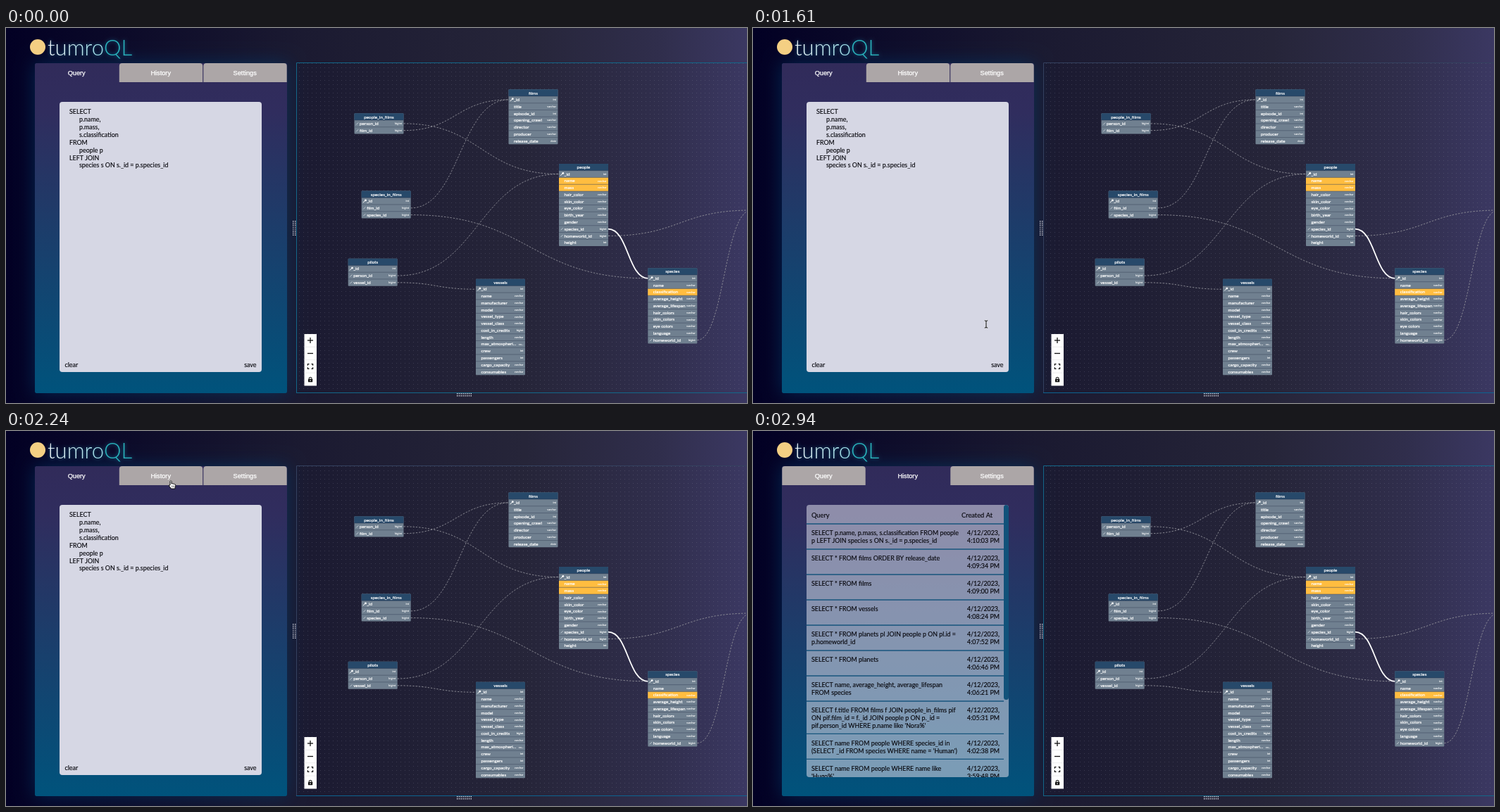
Write an HTML page with a canvas that moves like this. It is 1052 px wide and 533 px high and loops after 3920 ms.

```html
<!DOCTYPE html>
<html lang="en">
<head>
<meta charset="utf-8">
<title>Query history</title>
<style>
  html, body { margin: 0; width: 100%; height: 100%; overflow: hidden; background: #020024; }
  canvas { display: block; width: 1052px; height: 533px; }
</style>
</head>
<body>
<canvas id="stage" width="1052" height="533"></canvas>
<script>
const W = 1052, H = 533, LOOP = 3920, STEP = 70;
const CURSOR_IN = 980, HISTORY_OPEN = 2940;
const ctx = document.getElementById('stage').getContext('2d');
const LATO = 'Lato, sans-serif';
const ARIAL = '"Liberation Sans", Arial, sans-serif';

function gradient(x0, y0, x1, y1, ...stops) {
  const g = ctx.createLinearGradient(x0, y0, x1, y1);
  stops.forEach(([at, color]) => g.addColorStop(at, color));
  return g;
}

function box(x, y, w, h, fill, radius = 0) {
  ctx.fillStyle = fill;
  ctx.beginPath();
  ctx.roundRect(x, y, w, h, radius);
  ctx.fill();
}

// `bold` thickens the glyphs by a hairline without changing their widths.
function text(str, x, y, size, color, { align = 'left', family = LATO, weight = 400, bold = 0 } = {}) {
  ctx.font = `${weight} ${size}px ${family}`;
  ctx.textAlign = align;
  ctx.textBaseline = 'alphabetic';
  ctx.fillStyle = ctx.strokeStyle = color;
  ctx.fillText(str, x, y);
  if (!bold) return;
  ctx.lineWidth = bold;
  ctx.strokeText(str, x, y);
}

function line(color, width, ...points) {
  ctx.strokeStyle = color;
  ctx.lineWidth = width;
  ctx.beginPath();
  points.forEach(([x, y], i) => i ? ctx.lineTo(x, y) : ctx.moveTo(x, y));
  ctx.stroke();
}

// ---- Diagram -------------------------------------------------------------
// Row prefixes: ! primary key, & foreign key, * selected column.
const TABLE_W = 70, HEAD_H = 9.7, ROW_H = 9.76;
const tables = {
  films: [713.5, 87.3, '!_id:int title episode_id:int opening_crawl director producer release_date:date'],
  people_in_films: [494.5, 121.3, '&person_id:bigint &film_id:bigint'],
  people: [785, 193, '!_id:int *name *mass hair_color skin_color eye_color birth_year gender &species_id:bigint &homeworld_id:bigint height:int'],
  species_in_films: [504.7, 231.5, '!_id:int &film_id:bigint &species_id:bigint'],
  pilots: [485.7, 327.7, '!_id:int &person_id:bigint &vessel_id:bigint'],
  vessels: [667, 356.7, '!_id:int name manufacturer model vessel_type vessel_class cost_in_credits:bigint length max_atmospheri...:va... crew:int passengers:int cargo_capacity consumables'],
  species: [911.3, 341.2, '!_id:int name *classification average_height average_lifespan hair_colors skin_colors eye~colors language &homeworld_id:bigint'],
};

const rowY = (table, row) => tables[table][1] + HEAD_H + (row + 0.5) * ROW_H;
const out = (table, row) => [tables[table][0] + TABLE_W, rowY(table, row)];
const into = table => [tables[table][0], rowY(table, 0)];
const offstage = [1058, 259];
const links = [
  [out('people_in_films', 0), into('people')],
  [out('people_in_films', 1), into('films')],
  [out('species_in_films', 1), into('films')],
  [out('species_in_films', 2), into('species')],
  [out('pilots', 1), into('people')],
  [out('pilots', 2), into('vessels')],
  [out('people', 9), offstage],
  [out('species', 9), offstage],
];

function drawLink([[x0, y0], [x1, y1]], color, width, dash) {
  const mid = (x0 + x1) / 2;
  ctx.setLineDash(dash);
  ctx.strokeStyle = color;
  ctx.lineWidth = width;
  ctx.beginPath();
  ctx.moveTo(x0, y0);
  ctx.bezierCurveTo(mid, y0, mid, y1, x1, y1);
  ctx.stroke();
  ctx.setLineDash([]);
}

function drawKey(x, y) {
  line('#fff', 1, [x, y + 2.2], [x + 3.2, y - 1]);
  ctx.beginPath();
  ctx.arc(x + 3.6, y - 1.2, 1.4, 0, 7);
  ctx.fillStyle = '#fff';
  ctx.fill();
}

function drawTable(name) {
  const [x, y, spec] = tables[name];
  const rows = spec.split(' ');
  box(x, y, TABLE_W, HEAD_H + rows.length * ROW_H, '#708090', 1);
  box(x, y, TABLE_W, HEAD_H, '#27496a', [1, 1, 0, 0]);
  text(name, x + TABLE_W / 2, y + 7.2, 6.3, '#fff', { align: 'center', bold: 0.2 });
  rows.forEach((row, i) => {
    const [, mark, label, type = 'varchar'] = row.match(/^([!&*]?)([^:]+):?(.+)?$/);
    const cy = rowY(name, i), top = cy - ROW_H / 2;
    if (mark === '*') box(x, top, TABLE_W, ROW_H, '#ffbd40');
    line('rgba(40,50,75,.5)', 0.8, [x, top], [x + TABLE_W, top]);
    if (mark === '!') drawKey(x + 2.2, cy);
    if (mark === '&') line('#c3ccd5', 1, [x + 2.6, cy + 1.6], [x + 5.6, cy - 1.4]);
    text(label.replace('~', ' '), x + 7.5, cy + 2.1, 6.3, '#fff', { bold: 0.2 });
    text(type, x + TABLE_W - 2.5, cy + 1.2, 3.9, '#fff', { align: 'right', weight: 700 });
  });
}

function dotPattern() {
  const tile = document.createElement('canvas');
  tile.width = tile.height = 6;
  const t = tile.getContext('2d');
  t.fillStyle = 'rgba(150,150,170,.24)';
  t.fillRect(2, 2, 1, 1);
  return ctx.createPattern(tile, 'repeat');
}
const dots = dotPattern();

function drawControls() {
  box(423.5, 435, 17.5, 73.5, '#fefefe');
  for (const y of [453.3, 471.7, 490.1]) line('#e6e6e6', 0.7, [423.5, y], [441, y]);
  line('#111', 1.3, [428, 444], [436, 444]);
  line('#111', 1.3, [432, 440], [432, 448]);
  line('#111', 1.3, [428, 462.5], [436, 462.5]);
  for (const sx of [-1, 1]) for (const sy of [-1, 1])
    line('#111', 1.2, [432 + sx * 1.5, 481 + sy * 3.3], [432 + sx * 3.6, 481 + sy * 3.3], [432 + sx * 3.6, 481 + sy * 1.3]);
  box(429, 498.7, 6.2, 4.6, '#111', 0.6);
  ctx.beginPath();
  ctx.arc(432.1, 498.4, 1.9, Math.PI, 0);
  ctx.stroke();
  box(431.4, 500.2, 1.3, 1.5, '#fff');
}

function drawGrips() {
  for (let i = 0; i < 8; i++) for (const side of [0, 3]) {
    box(407 + side, 274 + i * 2.8, 1.4, 1.4, '#c9cad6');
    box(640 + i * 2.8, 519 + side, 1.4, 1.4, '#d5d6df');
  }
}

function drawDiagram(dull) {
  ctx.fillStyle = dots;
  ctx.fillRect(413, 50, W - 413, 469);
  line(dull ? '#34415f' : '#136789', 1, [W, 49.5], [412.5, 49.5], [412.5, 519]);
  line(dull ? '#0d6390' : '#136789', 1, [412, 518.5], [W, 518.5]);
  links.forEach(link => drawLink(link, '#8f8f98', 0.9, [2.4, 1.9]));
  drawLink([out('people', 8), into('species')], '#fff', 1.8, []);
  Object.keys(tables).forEach(drawTable);
  drawControls();
  drawGrips();
}

// ---- Left panel ----------------------------------------------------------
function drawBackdrop() {
  box(0, 0, W, H, gradient(0, 0, W, 0, [0, '#020024'], [0.4, '#1b1a31'], [0.7, '#262539'], [0.88, '#302e4c'], [1, '#3b3862']));
  ctx.save();
  ctx.shadowColor = 'rgba(0,65,115,.55)';
  ctx.shadowBlur = 26;
  box(41, 50, 358, 469, '#123e69', 3);
  ctx.restore();
  box(41, 50, 358, 469, gradient(0, 50, 0, 519, [0, '#312b5a'], [0.15, '#302d5e'], [1, '#00537c']), 3);
}

function drawLogo() {
  ctx.beginPath();
  ctx.arc(45, 27, 11, 0, 7);
  ctx.fillStyle = '#f4cf83';
  ctx.fill();
  ctx.save();
  ctx.shadowColor = 'rgba(30,170,210,.6)';
  ctx.shadowBlur = 5;
  text('tumro', 59, 39, 31, gradient(59, 0, 146, 0, [0, '#f2f7fa'], [1, '#8fd9e4']), { weight: 300 });
  const x = 59 + ctx.measureText('tumro').width;
  text('QL', x, 39, 31, '#2ab5bd', { weight: 300 });
  ctx.restore();
}

function drawTabs(active) {
  ['Query', 'History', 'Settings'].forEach((label, i) => {
    const x = 41 + i * 119.5;
    if (i !== active) box(x + 0.3, 50, 118.4, 27, '#aca6a7', [4, 4, 0, 0]);
    text(label, x + 59.2, 67, 9.2, '#fff', { align: 'center', family: ARIAL, bold: 0.25 });
  });
}

const INK = '#08080e', BODY = 8.9, LEADING = 10.92;
const query = ['SELECT', '\tp.name,', '\tp.mass,', '\ts.classification', 'FROM', '\tpeople p', 'LEFT JOIN', '\tspecies s ON s._id = p.species_id'];

function drawEditor(saveHover) {
  box(76, 105, 287, 384, '#d6d7e4', 4);
  query.forEach((row, i) =>
    text(row.trim(), row[0] === '\t' ? 104 : 90, 122 + i * LEADING, BODY, INK, { bold: 0.15 }));
  text('clear', 83.5, 481.5, BODY, INK, { bold: 0.15 });
  text('save', 355.5, 481.5, BODY, saveHover ? '#8d8d99' : INK, { align: 'right', bold: 0.15 });
}

const history = [
  ['4:10:03', 'SELECT p.name, p.mass, s.classification FROM people', 'p LEFT JOIN species s ON s._id = p.species_id'],
  ['4:09:34', 'SELECT * FROM films ORDER BY release_date'],
  ['4:09:00', 'SELECT * FROM films'],
  ['4:08:24', 'SELECT * FROM vessels'],
  ['4:07:52', 'SELECT * FROM planets pl JOIN people p ON pl.id =', 'p.homeworld_id'],
  ['4:06:46', 'SELECT * FROM planets'],
  ['4:06:21', 'SELECT name, average_height, average_lifespan', 'FROM species'],
  ['4:05:31', 'SELECT f.title FROM films f JOIN people_in_films pif', 'ON pif.film_id = f._id JOIN people p ON p._id =', "pif.person_id WHERE p.name like 'Nora%'"],
  ['4:02:38', 'SELECT name FROM people WHERE species_id in', "(SELECT _id FROM species WHERE name = 'Human')"],
  ['3:59:48', 'SELECT name FROM people WHERE name like', "'Hugo%'"],
];

function drawHistory() {
  ctx.save();
  ctx.beginPath();
  ctx.roundRect(76, 105, 287, 387, 4);
  ctx.clip();
  box(76, 105, 287, 387, 'rgba(213,214,228,.57)');
  text('Query', 83, 122.5, 9.3, INK, { bold: 0.15 });
  text('Created At', 296, 122.5, 9.3, INK, { bold: 0.15 });
  let y = 132;
  for (const [time, ...lines] of history) {
    line('#17557d', 1.3, [76, y], [356, y]);
    lines.forEach((str, i) => text(str, 83, y + 16.2 + i * LEADING, BODY, INK, { bold: 0.15 }));
    ['4/12/2023,', time + ' PM'].forEach((str, i) =>
      text(str, 350, y + 16.2 + i * LEADING, BODY, INK, { align: 'right', bold: 0.15 }));
    y += lines.length > 2 ? 46.4 : 36;
  }
  box(356, 105, 7, 277, '#11527a', 3.5);
  ctx.restore();
}

// ---- Pointer -------------------------------------------------------------
const path = [[1260, 357, 482], [1610, 331, 421], [1890, 292, 188], [2240, 236, 76], [2380, 229, 73], [2940, 229, 73]];

// Monotone cubic through the path points.
function along(axis, t) {
  if (t <= path[0][0]) return path[0][axis];
  const slope = i => (path[i + 1][axis] - path[i][axis]) / (path[i + 1][0] - path[i][0]);
  const tangent = i => {
    if (i === 0 || i === path.length - 1) return 0;
    const a = slope(i - 1), b = slope(i);
    return a * b > 0 ? 2 * a * b / (a + b) : 0;
  };
  const i = path.findIndex((p, k) => t >= p[0] && t < path[k + 1][0]);
  const span = path[i + 1][0] - path[i][0], u = (t - path[i][0]) / span, v = 1 - u;
  return path[i][axis] * (1 + 2 * u) * v * v + path[i + 1][axis] * u * u * (3 - 2 * u)
    + span * u * v * (tangent(i) * v - tangent(i + 1) * u);
}

function outline(x, y, d) {
  ctx.save();
  ctx.translate(x, y);
  const shape = new Path2D(d);
  ctx.fillStyle = '#fff';
  ctx.fill(shape);
  ctx.lineJoin = 'round';
  ctx.strokeStyle = '#111';
  ctx.lineWidth = 1;
  ctx.stroke(shape);
  ctx.restore();
}

function drawHand(x, y) {
  outline(x, y, 'M-3-4.5Q-2-6.5-1-4.5V-1Q.5-2 1.2-.8Q2.5-1.5 3.2-.2Q5-.5 4.8 1.5L4 4.5V6H-1.5L-4.5 2Q-5 .2-3 1Z');
  for (const dx of [0, 1.6, 3.2]) line('#333', 0.6, [x - 0.4 + dx, y + 1.5], [x - 0.4 + dx, y + 4]);
}

function drawBeam(x, y) {
  for (const [color, width] of [['rgba(255,255,255,.6)', 2.4], ['#111', 1.1]]) {
    line(color, width, [x, y - 4.5], [x, y + 4.5]);
    for (const s of [-1, 1])
      line(color, width, [x - 2.2, y + s * 5.3], [x, y + s * 4.5], [x + 2.2, y + s * 5.3]);
  }
}

function drawPointer(x, y, onSave) {
  if (onSave || y < 79) drawHand(x, y);
  else if (y > 105) drawBeam(x, y);
  else outline(x - 3, y - 5, 'M0 0V10L2.3 8L4 11.5L5.5 10.8L4 7.3H7Z');
}

// ---- Loop ----------------------------------------------------------------
function draw(t) {
  const historyOpen = t >= HISTORY_OPEN;
  const pointing = t >= CURSOR_IN && !historyOpen;
  const tick = Math.floor(t / STEP) * STEP;
  const onSave = pointing && along(2, tick) > 473;
  drawBackdrop();
  drawLogo();
  drawTabs(historyOpen ? 1 : 0);
  if (historyOpen) drawHistory();
  else drawEditor(onSave);
  drawDiagram(pointing);
  if (pointing) drawPointer(along(1, tick), along(2, tick), onSave);
}

function frame() {
  draw(performance.now() % LOOP);
  requestAnimationFrame(frame);
}
frame();
</script>
</body>
</html>
```
